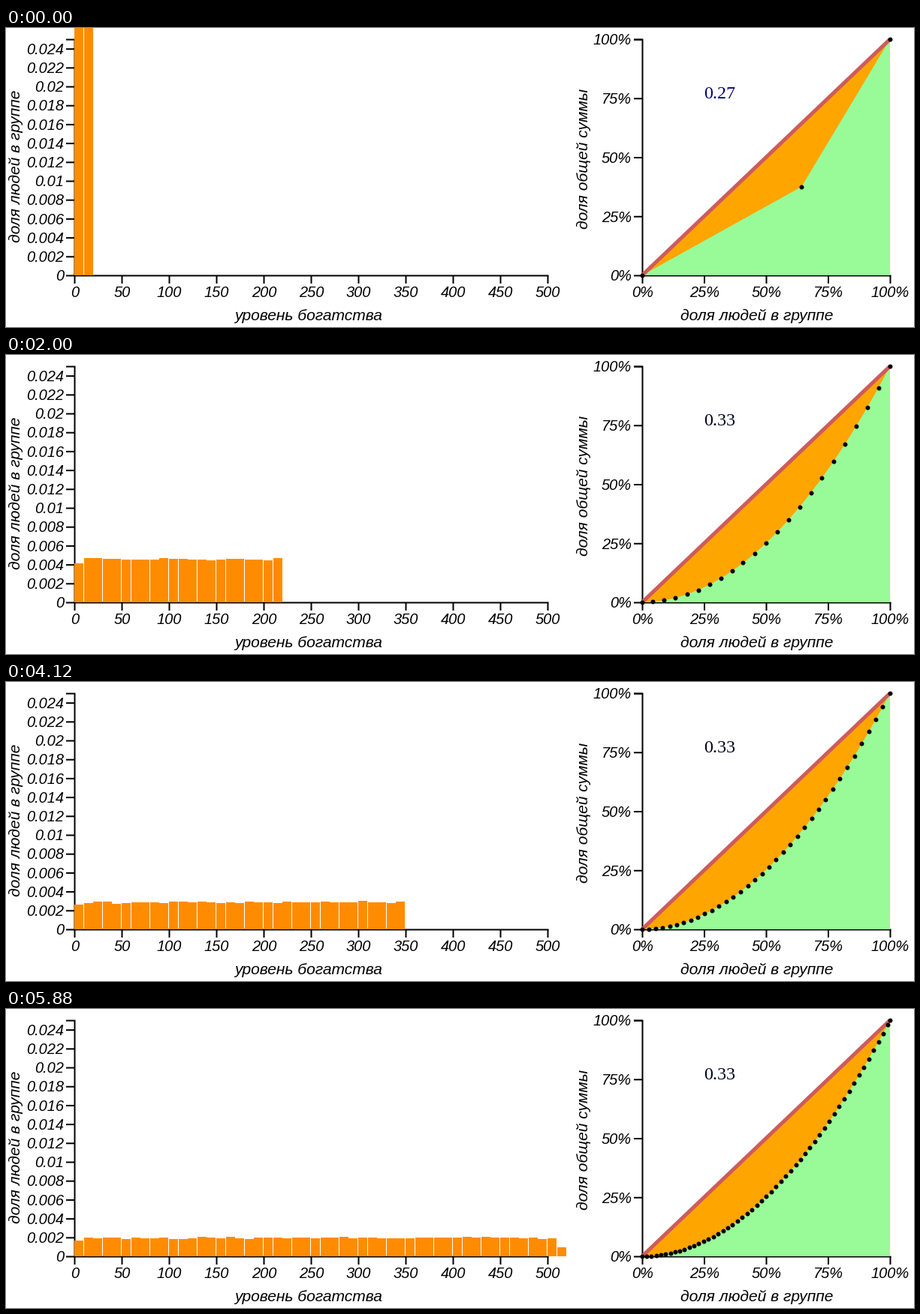
A matplotlib script that plays this animation: 1209 px wide and 399 px high, repeating every 5900 ms.

```python
import numpy as np
import matplotlib.pyplot as plt
from matplotlib.animation import FuncAnimation
from matplotlib.collections import PolyCollection

WIDTH, HEIGHT, DPI = 1209, 399, 64
PX = 72 / DPI                      # points per pixel
STEP_MS, LOOP_MS = 20, 5900
SAMPLES = 60000

# How long each state is held, in ms
HOLDS = ([100] * 22 + [20] + [100] * 20 + [20] + [100] * 4 + [20] + [100] * 3
         + [20] + [100] * 2 + [100, 20] * 3 + [20, 120] + [20] * 11)
STARTS = np.cumsum([0] + HOLDS[:-1])

HIST_X, HIST_UNIT, HIST_H = 91, 1.26, 12600
LOR_X, LOR_W, LOR_H = 847, 330, 315
BASE = 330

fig = plt.figure(figsize=(WIDTH / DPI, HEIGHT / DPI), dpi=DPI, facecolor="white")
ax = fig.add_axes([0, 0, 1, 1])
ax.set(xlim=(0, WIDTH), ylim=(HEIGHT, 0))
ax.axis("off")


def stroke(xs, ys, color="black", width=2, z=1):
    ax.plot(xs, ys, color=color, lw=width * PX, zorder=z, snap=False,
            solid_capstyle="butt", solid_joinstyle="miter")


def label(x, y, text, size=20, ha="center", rotation=0):
    ax.text(x, y, text, family="Liberation Sans", style="italic",
            fontsize=size * PX, ha=ha, va="baseline",
            rotation=rotation, rotation_mode="anchor")


def draw_axes(left, width, x_ticks, y_ticks):
    """Ticks are (offset from the origin, text) pairs; lines sit on half pixels."""
    x0, y0 = left + .5, BASE + .5
    stroke([left - 11, x0, x0], [y0 - LOR_H, y0 - LOR_H, y0])
    stroke([x0 - 1, x0 + width + 1], [y0, y0])
    for dx, text in x_ticks:
        stroke([x0 + dx, x0 + dx], [y0, BASE + 11])
        label(x0 + dx, 359, text)
    for dy, text in y_ticks:
        stroke([left - 11, x0], [y0 - dy, y0 - dy])
        label(left - 14, y0 - dy + 6.8, text, ha="right")


draw_axes(HIST_X, 500 * HIST_UNIT,
          [(v * HIST_UNIT, str(v)) for v in range(0, 501, 50)],
          [(v / 1000 * HIST_H, f"{v / 1000:g}") for v in range(0, 25, 2)])
draw_axes(LOR_X, LOR_W,
          [(q * LOR_W / 4, f"{25 * q}%") for q in range(5)],
          [(q * LOR_H / 4, f"{25 * q}%") for q in range(5)])

TITLE = 21
label(403, 390, "уровень богатства", TITLE)
label(1000, 390, "доля людей в группе", TITLE)
label(19, 184.5, "доля людей в группе", TITLE, rotation=90)
label(775, 174.5, "доля общей суммы", TITLE, rotation=90)

bars = PolyCollection([], facecolors="darkorange", linewidths=0, zorder=2)
areas = PolyCollection([], facecolors=["orange", "palegreen"], linewidths=0, zorder=2)
ax.add_collection(bars, autolim=False)
ax.add_collection(areas, autolim=False)
stroke([LOR_X, LOR_X + LOR_W], [BASE, BASE - LOR_H], "indianred", 5, 3)
dots, = ax.plot([], [], "o", color="black", ms=6 * PX, mew=0, zorder=4, snap=False)
gini_text = ax.text(LOR_X + LOR_W / 4, 94, "", family="Liberation Serif",
                    fontsize=24 * PX, va="baseline")


def richest(state):
    """Largest wealth level; growth slows down, then becomes steady."""
    if state < 29:
        fives = 3 + 2.55 * state - .0246 * state ** 2
    else:
        fives = np.interp(state, [29, 42, 53, 73], [56, 70, 81, 103])
    return 5 * int(round(fives)) - 1


def group_shares(state):
    """Sampled share of people per ten levels, uniform over 1..richest."""
    top = richest(state)
    share = np.full(top // 10 + 1, 10.0)
    share[0], share[-1] = 9, top % 10 + 1
    share /= top
    if state:
        noise = np.random.default_rng(state).normal(size=share.size)
        share += noise * np.sqrt(share / SAMPLES)
    return share / share.sum()


def update(frame):
    state = np.searchsorted(STARTS, frame * STEP_MS, side="right") - 1
    share = group_shares(state)

    rects = []
    for i, s in enumerate(share):
        x0 = HIST_X + 10 * i * HIST_UNIT
        x1 = x0 + 10 * HIST_UNIT - .6
        top = BASE - s / 10 * HIST_H
        rects.append([(x0, BASE), (x0, top), (x1, top), (x1, BASE)])
    bars.set_verts(rects)

    wealth = share * (10 * np.arange(share.size) + 5)
    people = np.concatenate([[0], np.cumsum(share)])
    owned = np.concatenate([[0], np.cumsum(wealth) / wealth.sum()])
    gini = 1 - np.sum(np.diff(people) * (owned[1:] + owned[:-1]))

    x, y = LOR_X + people * LOR_W, BASE - owned * LOR_H
    curve = list(zip(x, y))
    corner = (LOR_X + LOR_W, BASE)
    triangle = [(LOR_X, BASE), (LOR_X + LOR_W, BASE - LOR_H), corner]
    areas.set_verts([triangle, curve + [corner]])
    dots.set_data(x, y)
    gini_text.set_text(f"{gini:.2f}")
    gini_text.set_color("#00001f" if state else "navy")
    return bars, areas, dots, gini_text


anim = FuncAnimation(fig, update, frames=LOOP_MS // STEP_MS,
                     interval=STEP_MS, repeat=True, repeat_delay=0)
plt.show()
```
